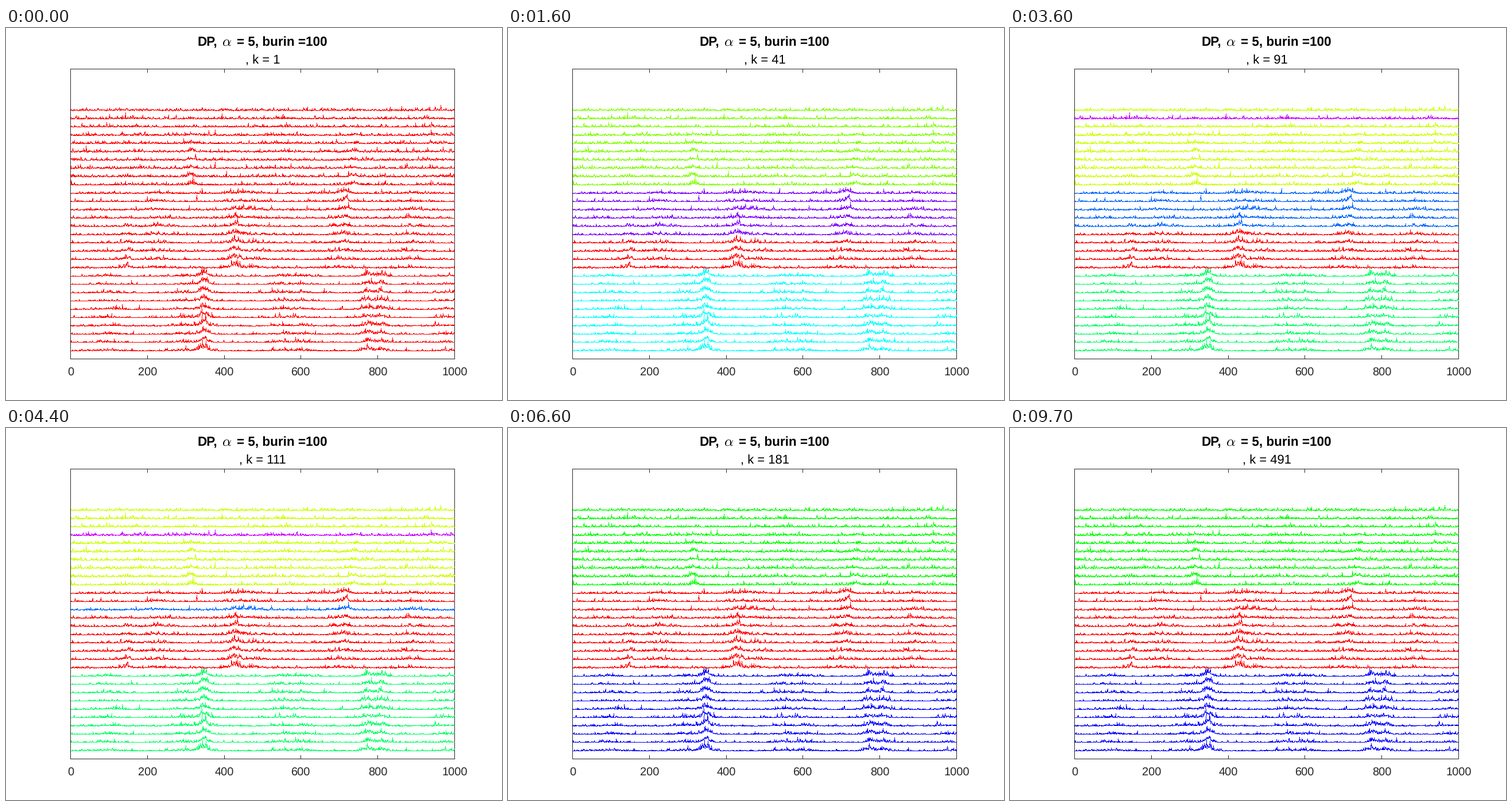
A matplotlib script that plays this animation: 864x648 px, repeating every 9800 ms.

```python
import colorsys

import matplotlib.pyplot as plt
import numpy as np
from matplotlib.animation import FuncAnimation

plt.rcParams["path.simplify"] = False
plt.rcParams["mathtext.fontset"] = "cm"
plt.rcParams["text.hinting"] = "none"

W, H = 864, 648
LEFT, RIGHT, TOP, BOTTOM = 112.5, 781.5, 71.5, 576.5
BASE, ROW_GAP = 576.75, 14.42
ROWS, POINTS = 30, 1000
GRAY = "#262626"
SANS = "Liberation Sans"
STEP_MS, SLOW_TICKS, SLOW_STEPS, FRAMES = 100, 4, 16, 98

# Number of clusters while they are still settling; the last value stays.
COUNTS = [1, 3, 4, 5, 4, 4, 5, 6, 4, 5, 5, 5, 3, 4, 4, 3]

# Per ten rows: floor, sharp peaks (centre, first and last height),
# height of the broad bumps and their centres.
GROUPS = [
    (0.4, [(348, 7, 7), (773, 4, 3), (810, 3, 3)],
     1.3, [95, 290, 345, 545, 600, 790, 985]),
    (0.8, [(148, 4, 0), (427, 7, 0), (715, 0, 5)],
     1.3, [225, 427, 475, 700, 890]),
    (1.2, [(315, 4, 0), (735, 4, 0)],
     0.6, [160, 545, 945]),
]


def to_px(x):
    return LEFT + (RIGHT - LEFT) * x / 1000


def bump(x, centre, sigma):
    return np.exp(-0.5 * ((x - centre) / sigma) ** 2)


def make_row(row, rng):
    """Spiky non-negative noise whose mean follows the row's bumps."""
    x = np.arange(1, POINTS + 1)
    group, pos = divmod(row - 1, 10)
    floor, peaks, height, centres = GROUPS[group]
    mean = floor + height * sum(bump(x, c, 22) for c in centres)
    for centre, first, last in peaks:
        mean += (first + (last - first) * pos / 9) * bump(x, centre, 9)
    return to_px(x), BASE - ROW_GAP * row - rng.gamma(mean / 1.3, 1.3)


def hard_trace(x, y):
    """One-pixel line without smoothing, built from whole-pixel columns."""
    mid = (y[1:] + y[:-1]) / 2
    before, after = np.r_[y[0], mid], np.r_[mid, y[-1]]
    top = np.floor(np.minimum(y, np.minimum(before, after)))
    low = np.floor(np.maximum(y, np.maximum(before, after))) + 1
    xs = np.repeat(np.floor(x) + 0.5, 3)
    ys = np.column_stack([top, low, np.full_like(y, np.nan)]).ravel()
    return xs, ys


def cluster(row, step, count):
    if row <= 10:
        return 2 if row > 1 or step > 1 else 0
    if row <= 20:
        if count == 3:
            return 0
        if step < 10:
            return 3 if row > 14 + (step > 4) else 0
        # Late on, the shrinking cluster keeps only every third row.
        start = 16 if step % 2 else 10
        return 3 if row > start and row % 3 == (step + 1) % 3 else 0
    for stray in range(4, count):
        if row == 22 + (2 * stray - 1 - step) % 9:
            return stray
    return 1


def row_color(row, step):
    step = min(step, len(COUNTS) - 1)
    count = COUNTS[step]
    hue = cluster(row, step, count) % count / count
    return colorsys.hsv_to_rgb(hue, 1, 1)


def write(x, y, text, size, ha="center", **kw):
    return ax.text(x, y, text, fontsize=size, ha=ha, va="baseline",
                   family=SANS, **kw)


def draw(xs, ys, cap="butt", **kw):
    return ax.plot(xs, ys, lw=1, snap=False, solid_capstyle=cap, **kw)[0]


def rule(xs, ys):
    draw(xs, ys, cap="projecting", color=GRAY, zorder=1)


fig = plt.figure(figsize=(W / 72, H / 72), dpi=72, facecolor="white")
ax = fig.add_axes([0, 0, 1, 1])
ax.set_xlim(0, W)
ax.set_ylim(H, 0)
ax.axis("off")

rule([LEFT, RIGHT, RIGHT, LEFT, LEFT], [TOP, TOP, BOTTOM, BOTTOM, TOP])
for value in range(0, 1001, 200):
    px = to_px(value)
    tick = np.floor(px) + 0.5
    rule([tick, tick], [BOTTOM, BOTTOM - 6])
    rule([tick, tick], [TOP, TOP + 6])
    write(px, 606, str(value), 20, color=GRAY)

write(333.4, 31, "DP,", 22.5, ha="left", weight="bold")
write(384.5, 31, r"$\alpha$", 25)
write(559.5, 31, "= 5, burin =100", 22.5, ha="right", weight="bold")
counter = write(447, 62.5, "", 22)

rng = np.random.default_rng(12)
lines = [draw(*hard_trace(*make_row(row, rng)), zorder=2)
         for row in range(1, ROWS + 1)]


def update(frame):
    slow = SLOW_TICKS * SLOW_STEPS
    step = frame // SLOW_TICKS if frame < slow else SLOW_STEPS + frame - slow
    counter.set_text(f", k = {1 + 10 * step}")
    for row, line in enumerate(lines, 1):
        line.set_color(row_color(row, step))
    return [counter, *lines]


anim = FuncAnimation(fig, update, frames=FRAMES, interval=STEP_MS,
                     init_func=lambda: update(0), repeat=True,
                     repeat_delay=0, blit=False)
plt.show()
```
